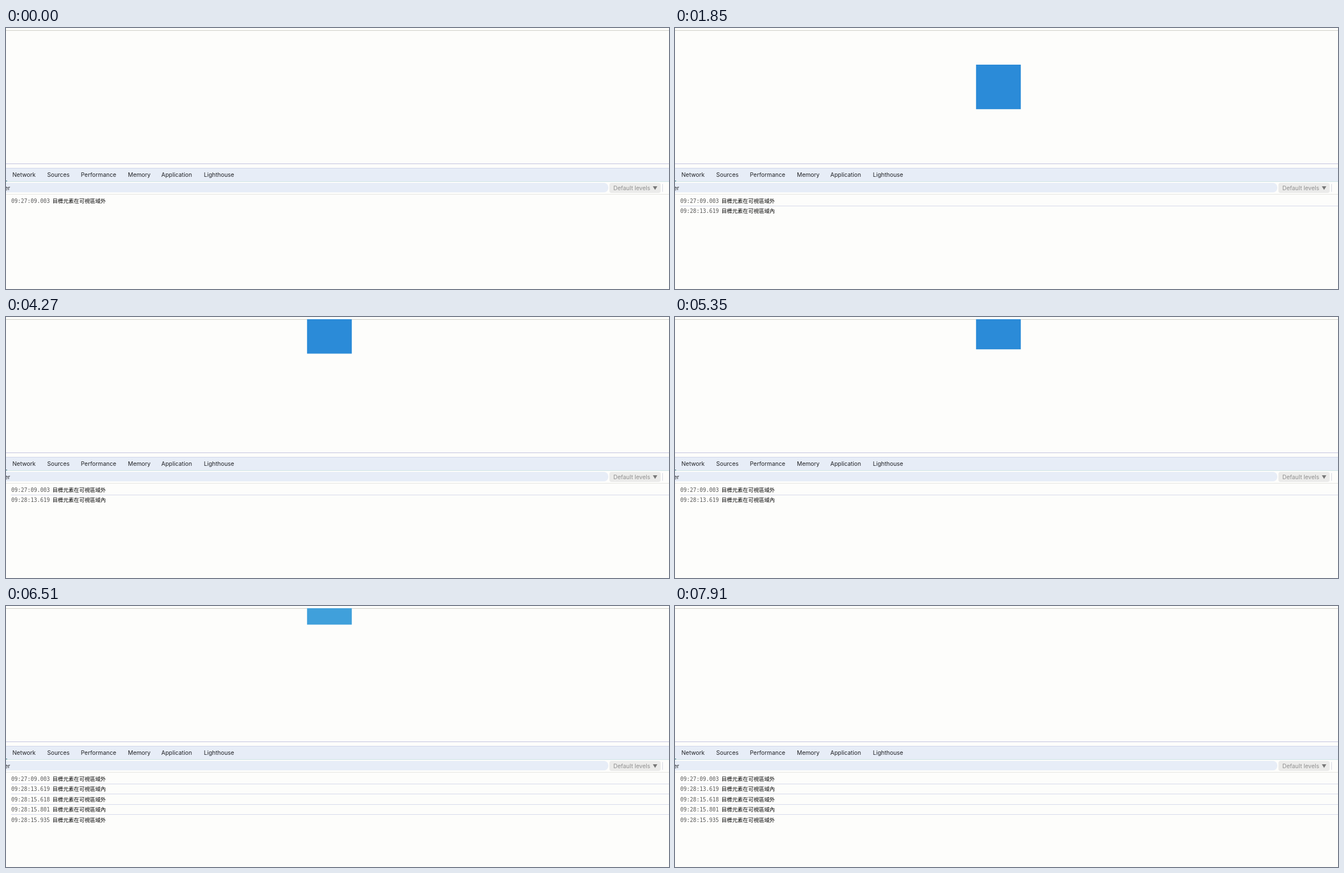
Recreate the animation shown at these times as an HTML page. Size 1191x470 px, loop 8000 ms.

```html
<!DOCTYPE html>
<html lang="zh-Hant">
<head>
<meta charset="utf-8">
<title>Scroll visibility log</title>
<style>
html, body { margin: 0; width: 100%; height: 100%; overflow: hidden; background: #fdfdfb; }
svg { display: block; width: 1191px; height: 470px; }
.ui { font: 10.4px Inter, sans-serif; fill: #202226; }
.log { font: 9.6px "DejaVu Sans Mono", monospace; fill: #585858; }
.log .msg { font: 500 9.6px "Noto Sans CJK TC", "Noto Sans CJK", sans-serif; fill: #000; }
.log path { stroke: #d5d9ea; }

.box { fill: #87ceeb; animation: scroll 8s linear infinite, tint 8s linear infinite; }
.row2 { animation: row2 8s step-end infinite; }
.row3 { animation: row3 8s step-end infinite; }
.row4 { animation: row4 8s step-end infinite; }
.row5 { animation: row5 8s step-end infinite; }

/* Vertical position of the box while the page is scrolled in several swipes */
@keyframes scroll {
  0%, 2.4%       { transform: translateY(250px); }
  3.1%           { transform: translateY(242px); }
  4.25%          { transform: translateY(204px); }
  5.5%           { transform: translateY(155px); }
  7%             { transform: translateY(115px); }
  8.5%           { transform: translateY(96px); }
  10%            { transform: translateY(93px); }
  11.4%, 12.5%   { transform: translateY(92px); }
  17.5%          { transform: translateY(76px); }
  21.9%, 23.2%   { transform: translateY(66px); }
  26.6%, 32.3%   { transform: translateY(60px); }
  36.5%          { transform: translateY(34px); }
  41.1%          { transform: translateY(13px); }
  42.8%, 46.1%   { transform: translateY(12px); }
  50%            { transform: translateY(-5px); }
  55.1%          { transform: translateY(-19px); }
  58.6%          { transform: translateY(-21px); }
  66.8%, 67.1%   { transform: translateY(-22px); }
  69.25%         { transform: translateY(-36px); }
  71.5%          { transform: translateY(-40px); }
  75.1%          { transform: translateY(-36px); }
  77%            { transform: translateY(-33px); }
  79.5%          { transform: translateY(-36px); }
  81.3%, 82.6%   { transform: translateY(-46.6px); }
  86.6%          { transform: translateY(-60px); }
  91%, 100%      { transform: translateY(-78px); }
}
@keyframes tint {
  0%, 4.25%      { fill: #87ceeb; }
  8.5%           { fill: #52ade0; }
  11.5%          { fill: #3594da; }
  14%, 69.25%    { fill: #2b8bd8; }
  75.1%          { fill: #62b3e2; }
  79.5%          { fill: #3796da; }
  81.3%, 82.6%   { fill: #40a0db; }
  89.5%, 100%    { fill: #87ceeb; }
}
@keyframes row2 { 0% { visibility: hidden; } 4.25%, 100% { visibility: visible; } }
@keyframes row3 { 0% { visibility: hidden; } 69.25%, 100% { visibility: visible; } }
@keyframes row4 { 0% { visibility: hidden; } 75.1%, 100% { visibility: visible; } }
@keyframes row5 { 0% { visibility: hidden; } 79.5%, 100% { visibility: visible; } }
</style>
</head>
<body>
<svg viewBox="0 0 1191 470">
  <clipPath id="port"><rect y="4.5" width="1191" height="239.5"/></clipPath>
  <rect width="1191" height="470" fill="#fdfdfb"/>
  <rect y="4" width="1191" height="1" fill="#cdcdc6"/>
  <g clip-path="url(#port)"><rect class="box" x="540.8" width="80.4" height="80.2"/></g>
  <rect y="244" width="1191" height="1" fill="#c1c1dd"/>

  <rect y="252" width="1191" height="24" fill="#e7edf7"/>
  <rect y="252" width="1191" height="1" fill="#d0d5ea"/>
  <rect y="276" width="1191" height="1" fill="#cce3e4"/>
  <rect y="275" width="2" height="1" fill="#246b78"/>
  <g class="ui">
    <text x="11.5" y="268">Network</text>
    <text x="74" y="268">Sources</text>
    <text x="134.5" y="268">Performance</text>
    <text x="219" y="268">Memory</text>
    <text x="279" y="268">Application</text>
    <text x="355.5" y="268">Lighthouse</text>
  </g>

  <rect x="-20" y="279" width="1102" height="17" rx="8" fill="#e7edf7"/>
  <text class="ui" x="7.5" y="291.5" text-anchor="end">Filter</text>
  <rect x="1084" y="279" width="92" height="18" rx="4" fill="#ebebea"/>
  <text class="ui" x="1091" y="291.5" style="fill:#8f8f8f">Default levels</text>
  <path d="M1162 285h8l-4 6.5z" fill="#777"/>
  <rect x="1179" y="281" width="1" height="14" fill="#d5d8e2"/>
  <rect y="299" width="1191" height="1" fill="#e5e5e0"/>

  <g class="log">
    <g>
      <text x="9.5" y="314.5">09:27:09.003</text>
      <text class="msg" x="83.5" y="314.5">目標元素在可視區域外</text>
    </g>
    <g class="row2">
      <path d="M9 320.5H1191"/>
      <text x="9.5" y="333">09:28:13.619</text>
      <text class="msg" x="83.5" y="333">目標元素在可視區域內</text>
    </g>
    <g class="row3">
      <path d="M9 338.5H1191"/>
      <text x="9.5" y="351.5">09:28:15.618</text>
      <text class="msg" x="83.5" y="351.5">目標元素在可視區域外</text>
    </g>
    <g class="row4">
      <path d="M9 357.5H1191"/>
      <text x="9.5" y="370">09:28:15.801</text>
      <text class="msg" x="83.5" y="370">目標元素在可視區域內</text>
    </g>
    <g class="row5">
      <path d="M9 375.5H1191"/>
      <text x="9.5" y="388.5">09:28:15.935</text>
      <text class="msg" x="83.5" y="388.5">目標元素在可視區域外</text>
    </g>
  </g>
</svg>
</body>
</html>
```
